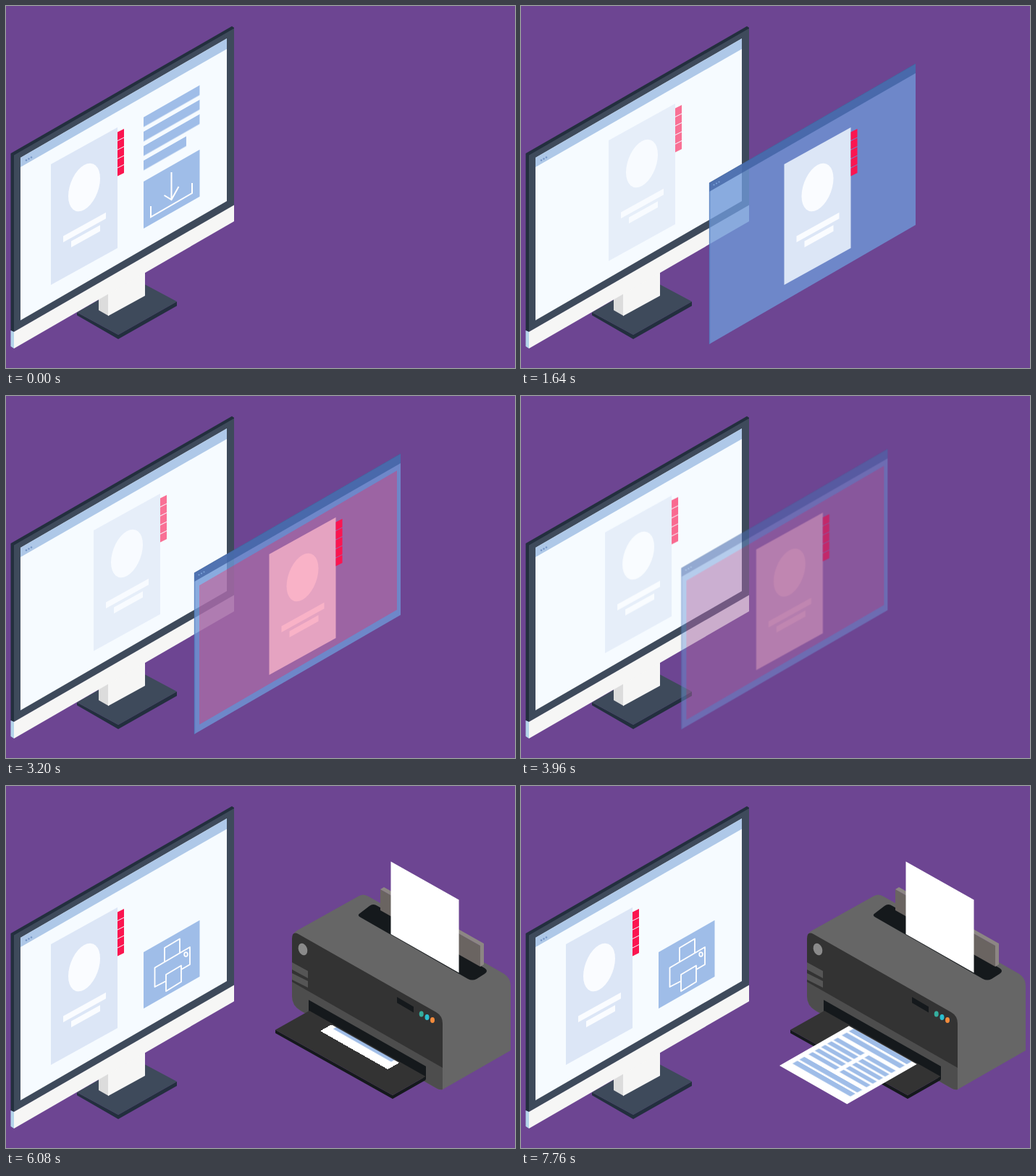
Write an HTML page that moves like this. It is 703x501 px and loops after 8 s.

```html
<!DOCTYPE html>
<html lang="en">
<head>
<meta charset="utf-8">
<title>Screen to print</title>
<style>
  html, body { margin: 0; width: 100%; height: 100%; overflow: hidden; background: #6d4592; }
  svg { display: block; width: 100vw; height: 100vh; }

  .download, .offer, .doc, .panel, .tint, .print, .press, .printer, .sheet {
    animation: 8s linear infinite both;
  }
  .download { animation-name: download; }
  .offer    { animation-name: offer; }
  .doc      { animation-name: doc; }
  .panel    { animation-name: panel; }
  .tint     { animation-name: tint; }
  .print    { animation-name: print; }
  .press    { animation-name: press; }
  .printer  { animation-name: printer; }
  .sheet    { animation-name: sheet; }

  @keyframes download {
    0%, 1.5% { transform: none; animation-timing-function: ease-in-out; }
    5% { transform: translate(-4.5px, 0); animation-timing-function: ease-in-out; }
    8%, 100% { transform: none; }
  }
  @keyframes offer {
    0%, 9.5% { opacity: 1; }
    13%, 100% { opacity: 0; }
  }
  @keyframes doc {
    0%, 9.5% { transform: none; opacity: 1; animation-timing-function: ease-in-out; }
    15% { transform: translate(59px, -33px); opacity: .9; }
    20.5%, 48.5% { transform: translate(59px, -33px); opacity: .6; animation-timing-function: ease-in-out; }
    53.5%, 100% { transform: none; opacity: 1; }
  }
  @keyframes panel {
    0%, 13% { transform: translate(-240px, -35px); opacity: 0; animation-timing-function: ease-in-out; }
    20%, 45% { transform: none; opacity: 1; animation-timing-function: ease-in-out; }
    47% { transform: translate(28px, 4px); opacity: .9; animation-timing-function: ease-in; }
    49.5% { transform: translate(-38px, -6.5px); opacity: .6; animation-timing-function: cubic-bezier(.3, .3, .7, .9); }
    53.5%, 100% { transform: translate(-240px, -35px); opacity: 0; }
  }
  @keyframes tint {
    0%, 26.5% { transform: translate(0, 194px); animation-timing-function: cubic-bezier(.37, 0, .63, 1); }
    40%, 100% { transform: none; }
  }
  @keyframes print {
    0%, 50.5% { opacity: 0; }
    53.5%, 100% { opacity: 1; }
  }
  @keyframes press {
    0%, 57% { transform: none; animation-timing-function: ease-in-out; }
    59.75% { transform: translate(-4px, 0); animation-timing-function: ease-in-out; }
    62.5%, 100% { transform: none; }
  }
  @keyframes printer {
    0%, 63.7% { transform: translate(0, 400px); animation-timing-function: cubic-bezier(.37, 0, .63, 1); }
    69%, 100% { transform: none; }
  }
  @keyframes sheet {
    0%, 72.5% { transform: translate(96px, -56px); animation-timing-function: ease-in-out; }
    76%, 78.5% { transform: translate(77px, -48px); animation-timing-function: ease-in-out; }
    82.5%, 85% { transform: translate(57px, -36px); animation-timing-function: ease-in-out; }
    89.5%, 92.5% { transform: translate(30px, -18px); animation-timing-function: ease-in-out; }
    97%, 100% { transform: none; }
  }
</style>
</head>
<body>
<svg viewBox="0 0 703 501" preserveAspectRatio="none">
  <defs>
    <g id="cover" transform="matrix(1 -.555 0 1 62 219)">
      <rect width="92" height="167" fill="#dce6f6"/>
      <g fill="#fafcff">
        <ellipse cx="46" cy="57.5" rx="22" ry="31"/>
        <rect x="17" y="109" width="59" height="8.5"/>
        <rect x="28" y="122" width="40" height="8.5"/>
      </g>
    </g>
    <path id="tabs" fill="#fb1550" d="M154 174.5l9-4.5v11.5l-9 4.5zm0 12.5l9-4.5v11.5l-9 4.5zm0 12.5l9-4.5v11.5l-9 4.5zm0 12.5l9-4.5v11.5l-9 4.5zm0 12.5l9-4.5v11l-9 4.5z"/>
    <path id="area" d="M267 262L540 103V296L267 455z"/>
    <clipPath id="areaClip"><use href="#area"/></clipPath>
    <clipPath id="outlet"><path d="M330 331H451L548 385.8V470H330z"/></clipPath>
  </defs>

  <rect width="703" height="501" fill="#6d4592"/>

  <!-- monitor -->
  <g>
    <path fill="#232f3e" d="M98 424L155 455L236 409V415L155 461L98 428z"/>
    <path fill="#3e4a5b" d="M98 424L178 378L236 409L155 455z"/>
    <path fill="#dcdcdc" d="M128 404L142 394V429L128 421z"/>
    <path fill="#f6f6f5" d="M141 394L192 364V401L141 429z"/>
    <path fill="#232f3e" d="M6.500 204L312 28L315 30V276L11 451L6.500 449z"/>
    <path fill="#3e4a5b" d="M11 206.500L315 31V276L11 451z"/>
    <path fill="#b4d5ea" d="M6.500 449L11 451V474L6.500 471z"/>
    <path fill="#f6f6f5" d="M11 451L315 275.500V298L11 474z"/>
    <path fill="#f6fbff" d="M20 210L305 45V270L20 435z"/>
    <path fill="#aec8e8" d="M20 210L305 45V59.500L20 223z"/>
    <g fill="#7596c8">
      <circle cx="28" cy="213.500" r="1.300"/><circle cx="31.500" cy="211.500" r="1.300"/><circle cx="35" cy="209.500" r="1.300"/>
    </g>
  </g>

  <!-- text lines and download button -->
  <g class="offer">
    <g fill="#9fbde8" transform="matrix(1 -.571 0 1 190 154)">
      <rect width="77.500" height="13.500"/>
      <rect y="20" width="77.500" height="13.500"/>
      <rect y="40" width="77.500" height="13.500"/>
      <rect y="60" width="59" height="13.500"/>
    </g>
    <g class="download">
      <path fill="#9fbde8" d="M190 243L267.500 198.700V263.700L190 308z"/>
      <path fill="none" stroke="#fff" stroke-width="2" d="M228.500 230V268M218.500 262L228.500 268L238.500 250M200 277V292L257 259V245"/>
    </g>
  </g>

  <!-- print button -->
  <g class="print">
    <g class="press">
      <path fill="#9fbde8" d="M190 230L267.500 185.700V263.700L190 308z"/>
      <g fill="none" stroke="#fff" stroke-width="1.800" stroke-linejoin="round">
        <path d="M221 270L205.500 278V251.500L254 223V247L242 254"/>
        <path d="M219 243V224L240 211.500V231M221 261L242 248.500V271L221 284z"/>
        <ellipse cx="248.500" cy="233" rx="2.300" ry="2.800"/>
      </g>
    </g>
  </g>

  <g class="doc">
    <use href="#cover"/>
    <use href="#tabs"/>
  </g>

  <!-- floating window -->
  <g class="panel">
    <path fill="#6f98d7" fill-opacity=".8" d="M260 245L545 80V303L260 468z"/>
    <path fill="#3e60a2" fill-opacity=".75" d="M260 245L545 80V93L260 257z"/>
    <path fill="none" stroke="#3f6199" stroke-opacity=".7" d="M260 245L545 80"/>
    <path stroke="#4a75b5" stroke-opacity=".6" stroke-width="1.500" d="M260.500 245V468"/>
    <g fill="#7da3d8">
      <circle cx="266.500" cy="247.500" r="1.100"/><circle cx="270" cy="245.500" r="1.100"/><circle cx="273.500" cy="243.500" r="1.100"/>
    </g>
    <use href="#cover" x="301.500"/>
    <g clip-path="url(#areaClip)">
      <use class="tint" href="#area" fill="#f6235c" fill-opacity=".34"/>
    </g>
    <use href="#tabs" x="301.500"/>
  </g>

  <!-- printer -->
  <g class="printer">
    <path fill="#666" d="M395 212Q395 204 402 200L486 153Q493 148 501 153L688 260Q697 266 697 276V366L603 420Q599 421 594 418L407 311Q395 304 395 291z"/>
    <path fill="#4d4d4d" d="M395 212L603 328V420Q599 421 594 418L407 311Q395 304 395 291z"/>
    <path fill="#333" d="M395 212Q395 200 404 205L594 313Q603 318 603 329V390L395 271z"/>
    <path fill="#555" d="M395 244L417 256V266L395 254zM395 259L417 270V279L395 268z"/>
    <ellipse cx="410" cy="226" rx="6" ry="8.500" transform="rotate(-20 410 226)" fill="#8a8a8a"/>
    <path fill="#15191c" d="M540 292L563 305.500V313.500L540 300z"/>
    <ellipse cx="573.700" cy="315.500" rx="3" ry="4" fill="#35ae9e"/>
    <ellipse cx="581.500" cy="320" rx="3" ry="4" fill="#2bbfd0"/>
    <ellipse cx="589" cy="324" rx="3" ry="4" fill="#f28b3c"/>

    <path fill="#15191c" d="M489 176L502 166Q507 162 513 166L661 252Q667 256 661 260L650 267Q644 270 638 267L490 182Q484 179 489 176z"/>
    <path fill="#6a6461" d="M517 143L655 221V250L517 172z"/>
    <path fill="#8c8683" d="M517 143L522 140L660 218V247L655 250V221z"/>
    <path fill="#fff" d="M531.500 104.500L625.500 157.500V258.500L531.500 205z"/>

    <path fill="#15191c" d="M418 296L580 388V406L418 318z"/>
    <path fill="#15191c" d="M372 337.500L534 428L579.500 402V407L534 433L372 342z"/>
    <path fill="#333" d="M372 337.500L419 311L579.500 402L534 428z"/>
    <g clip-path="url(#outlet)">
      <g class="sheet">
        <g transform="matrix(.93 .53 .96 -.55 357 387)">
          <rect width="100" height="110" fill="#fff"/>
          <path fill="#9fbde8" d="M7 12h86v7h-86zm0 10h86v7h-86zM7 83h86v7h-86zm0 10h86v7h-86z"/>
          <path id="column" fill="#9fbde8" d="M7 35h40v6h-40zm0 9h40v6h-40zm0 9h40v6h-40zm0 9h40v6h-40zm0 9h40v6h-40z"/>
          <use href="#column" x="46"/>
        </g>
      </g>
    </g>
  </g>
</svg>
</body>
</html>
```
